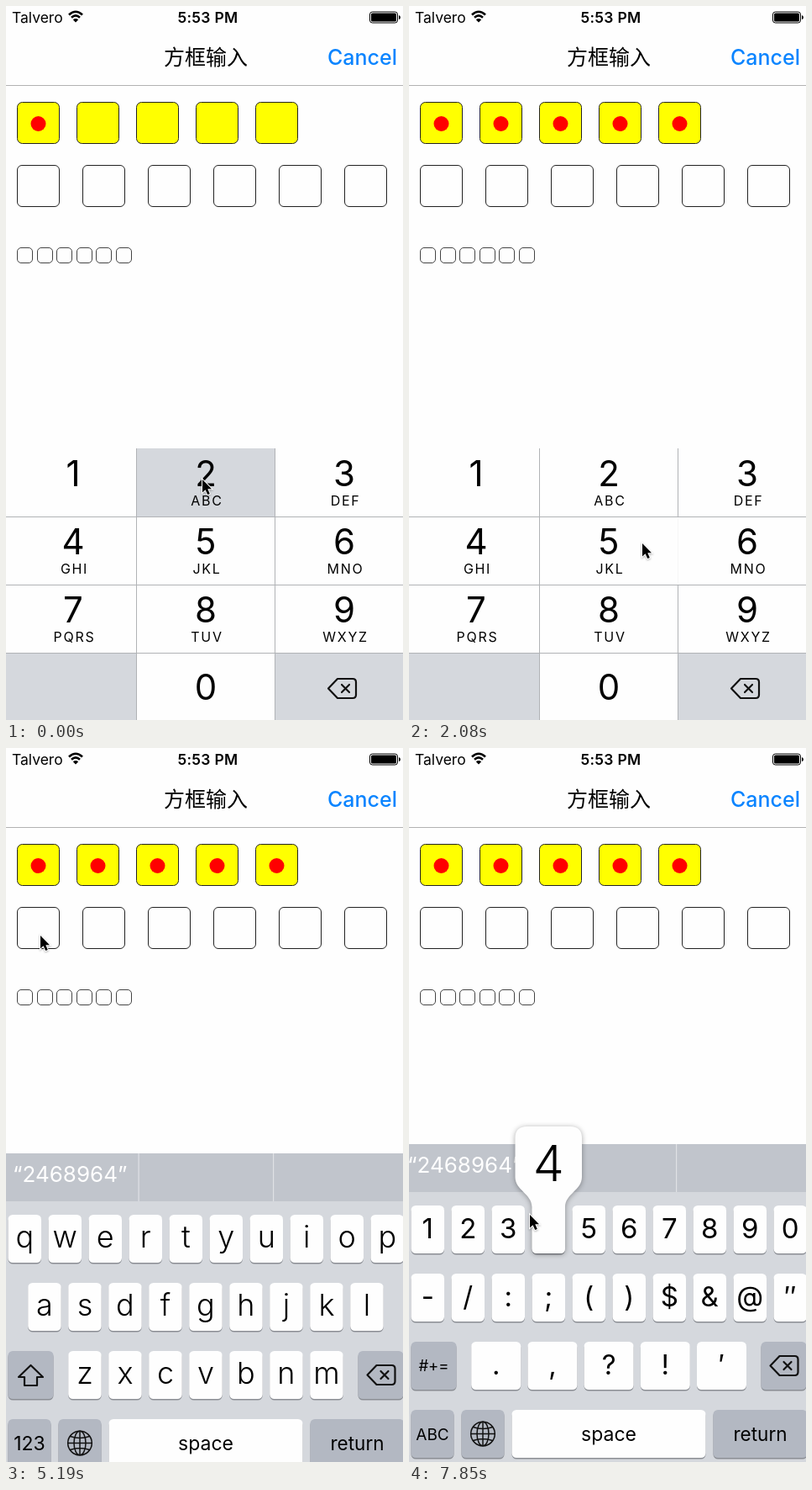
An HTML page for the animation above (7990 ms loop, 473 by 849 pixels).

```html
<!DOCTYPE html>
<html lang="zh">
<head>
<meta charset="utf-8">
<title>方框输入</title>
<style>
html, body { margin: 0; width: 100%; height: 100%; overflow: hidden; background: #fff; }
svg { display: block; width: 473px; height: 849px; }
text { font-family: Inter, Roboto, sans-serif; white-space: pre; }
.cjk { font-family: "Noto Sans CJK SC", "Noto Sans CJK", sans-serif; }
.icon { fill: none; stroke: #111; stroke-width: 2.2; stroke-linejoin: round; stroke-linecap: round; }
#pop path { fill: #fefefe; filter: drop-shadow(0 1px 3px rgba(0, 0, 0, .35)); }
</style>
</head>
<body>
<svg id="stage" viewBox="0 0 473 849"></svg>
<script>
const LOOP = 7990;
const GRAY = '#d5d8dd', DARK = '#b3b8c2', BLUE = '#0a84ff';

// Bursts of picture changes: [first, last, count]
const BURSTS = [
  [150, 1180, 8], [1330, 2080, 6], [2680, 3280, 5], [3580, 4600, 8],
  [4740, 5780, 8], [5920, 6960, 8], [7110, 7850, 6]
];
const TICKS = [0, ...BURSTS.flatMap(([from, to, n]) =>
  Array.from({ length: n }, (_, i) =>
    Math.round((from + (to - from) * i / (n - 1)) / 10) * 10))];

// Pointer path: [time, x, y]
const POINTER = [
  [0, 234, 563], [150, 110, 645], [440, 400, 650], [590, 270, 698],
  [740, 390, 700], [890, 400, 650], [1030, 105, 652], [1180, 105, 656],
  [1330, 102, 718], [1480, 104, 716], [2080, 278, 639], [2530, 278, 639],
  [3280, 441, 85], [3430, 441, 85], [3730, 442, 61], [4170, 442, 61],
  [4600, 41, 223], [5330, 41, 223], [5920, 325, 640], [6070, 335, 650],
  [6220, 335, 650], [6370, 358, 582], [6660, 140, 650], [6960, 98, 829],
  [7110, 42, 822], [7260, 28, 820], [7400, 30, 818], [7700, 128, 580], [7850, 144, 555]
];
// Downward offsets: [time, dy]
const PAD_SLIDE = [[0, 0], [4170, 50], [4310, 230], [4460, 330]];
const BOARD_SLIDE = [[0, 400], [4740, 340], [4890, 150], [5040, 45], [5190, 11], [5330, 0]];

const EVENTS = [
  [0, { dots: 1, pad: 2, pop: '', cancel: false, board: 'abc' }],
  [150, { dots: 2, pad: 4 }], [300, { pad: 0 }],
  [440, { dots: 3, pad: 6 }], [590, { dots: 4, pad: 0 }],
  [740, { dots: 5 }], [890, { pad: 6 }], [1030, { pad: 4 }], [1180, { pad: 0 }],
  [1330, { pad: 7 }], [1480, { pad: 0 }],
  [3880, { cancel: true }], [4170, { cancel: false }],
  [6220, { pop: 'j' }], [6370, { pop: 'i' }], [6510, { pop: '' }],
  [6660, { pop: 'd' }], [6810, { pop: '' }],
  [7260, { board: 'num' }], [7850, { pop: '4' }]
];

const escape = s => s.replace(/&/g, '&amp;');
const text = (x, y, s, size, extra = 'text-anchor="middle"') =>
  `<text x="${x}" y="${y}" font-size="${size}" ${extra}>${escape(s)}</text>`;
const rect = (x, y, w, h, extra = '') =>
  `<rect x="${x}" y="${y}" width="${w}" height="${h}" ${extra}/>`;
const times = (n, make) => Array.from({ length: n }, (_, i) => make(i)).join('');
const middle = weight => `text-anchor="middle" font-weight="${weight}"`;

const erase = (x, y) => `<path class="icon" transform="translate(${x} ${y})"
  d="M12 1H30Q34 1 34 5V20Q34 24 30 24H12L1 12.5ZM17 8L26 17M26 8L17 17"/>`;

function statusBar() {
  return text(7, 20, 'Talvero', 17.5, '')
    + `<g fill="none" stroke="#000" stroke-width="2.6">
        <path d="M75 10.5Q83 3 91 10.5M78 13.7Q83 9 88 13.7"/></g>
       <path d="M83 19.5L79.8 16.3Q83 13.5 86.2 16.3Z"/>`
    + text(240.5, 20, '5:53 PM', 17.5, middle(600) + ' letter-spacing=".3"')
    + rect(433.5, 7, 33, 13, 'rx="3" fill="none" stroke="#000"')
    + rect(435, 8.5, 30, 10, 'rx="1.5"')
    + '<path d="M468 11Q470 11.5 470 13.5T468 16Z"/>';
}

function form() {
  const box = 'fill="none" stroke="#222" rx="5.5"';
  return text(238, 70, '方框输入', 25, 'class="cjk" text-anchor="middle" font-weight="500"')
    + rect(384, 47, 82, 30, 'id="cancelBack" fill="#f8f8f8"')
    + text(466, 70, 'Cancel', 25, `id="cancel" text-anchor="end" font-weight="500" fill="${BLUE}"`)
    + rect(0, 94, 473, 1, 'fill="#b2b2b2"')
    + times(5, i => rect(13.5 + 71 * i, 114.5, 50, 49, 'fill="#ff0" stroke="#222" rx="6"'))
    + times(5, i => `<circle class="dot" cx="${38.5 + 71 * i}" cy="140" r="9" fill="red"/>`)
    + times(6, i => rect(13.5 + 78 * i, 189.5, 50, 49, box))
    + times(6, i => rect(Math.round(13 + 23.6 * i) + .5, 287.5, 18, 18, 'fill="none" stroke="#444" rx="4.5"'));
}

const PAD_LEFT = [0, 156, 321, 473], PAD_MID = [80, 238, 403];
const padLetters = ['', 'ABC', 'DEF', 'GHI', 'JKL', 'MNO', 'PQRS', 'TUV', 'WXYZ'];

function numberPad() {
  const line = 'fill="#b1b3b6"';
  return rect(0, 526, 473, 323, 'fill="#fefefe"')
    + rect(0, 770, 155, 79, `fill="${GRAY}"`) + rect(321, 770, 152, 79, `fill="${GRAY}"`)
    + rect(0, 526, 0, 81, `id="padDown" fill="${GRAY}"`)
    + times(3, i => rect(0, 607 + 81 * i, 473, 1, line))
    + rect(155, 526, 1, 323, line) + rect(320, 526, 1, 323, line)
    + rect(320, 608, 1, 80, 'id="fade" fill="#f6f6f6"')
    + padLetters.map((s, i) => {
        const x = PAD_MID[i % 3], y = 571 + 81 * Math.floor(i / 3);
        return text(x, y, String(i + 1), 42)
          + text(x + 1.5, y + 23, s, 16, 'text-anchor="middle" letter-spacing="1.7"');
      }).join('')
    + text(238, 825, '0', 42) + erase(383, 799);
}

const keyAt = {};
function key(x, y, w, label = '', size = 36, weight = 300, fill = '#fefefe') {
  keyAt[label] = [x, y, weight];
  return rect(x, y + 1.5, w, 57, 'rx="5.5" fill="#8b8e94"')
    + rect(x, y, w, 57, `rx="5.5" fill="${fill}"`)
    + text(x + w / 2, y + (size < 30 ? 28.5 + size * .37 : 39), label, size, middle(weight));
}
const row = (labels, x, y, size, weight, w = 39.5, step = 48) =>
  [...labels].map((s, i) => key(x + step * i, y, w, s, size, weight)).join('');

function board() {
  const letters = row('qwertyuiop', 2.5, 544) + row('asdfghjkl', 26.2, 625) + row('zxcvbnm', 74.2, 706)
    + key(2.5, 706, 54, '', 20, 400, DARK)
    + '<path class="icon" d="M29.5 723L44 737H37V747H22V737H15Z"/>'
    + key(2.5, 787, 51, '123', 23, 400, DARK);
  const symbols = row('1234567890', 2.5, 544, 33, 400) + row('-/:;()$&@″', 2.5, 625, 33, 400)
    + row('.,?!′', 74.2, 706, 33, 400, 59, 67.2)
    + key(2.5, 706, 54, '#+=', 18.5, 400, DARK) + key(2.5, 787, 51, 'ABC', 19, 400, DARK);
  const globe = `<g class="icon" style="stroke-width:1.5" transform="translate(88 815.5)">
    <circle r="14.3"/><ellipse rx="7" ry="14.3"/>
    <path d="M0-14V14M-14 0H14M-11.5-8Q0-4 11.5-8M-11.5 8Q0 4 11.5 8"/></g>`;
  return rect(0, 471, 473, 400, `fill="${GRAY}"`) + rect(0, 471, 473, 57, 'fill="#c1c5cc"')
    + rect(157.5, 471, 1.2, 57, 'fill="#dfe1e5"') + rect(318, 471, 1.2, 57, 'fill="#dfe1e5"')
    + text(8, 505, '“2468964”', 26, 'id="hint" fill="#fff"')
    + key(419.5, 706, 54, '', 20, 400, DARK) + erase(429.5, 722)
    + key(62.5, 787, 51, '', 20, 400, DARK) + globe
    + key(122.5, 787, 231, 'space', 23, 400) + key(362.5, 787, 112, 'return', 22.5, 400, DARK)
    + `<g id="abc">${letters}</g><g id="num">${symbols}</g>
      <g id="pop"><path d="M-20-80Q-20-94-6-94H45.5Q59.5-94 59.5-80V-34C59.5-18 39.5-14 39.5 2
        V51Q39.5 57 33.5 57H6Q0 57 0 51V2C0-14-20-18-20-34Z"/>${text(19.7, -29, '', 59)}</g>`;
}

const stage = document.getElementById('stage');
stage.innerHTML = rect(0, 0, 473, 849, 'fill="#fefefe"') + statusBar() + form()
  + `<g id="pad">${numberPad()}</g><g id="board">${board()}</g>
     <path id="pointer" d="M0 0V15.5L3.6 12.3 6.2 18 8.8 16.9 6.3 11.2H11Z"
       stroke="#fff" stroke-width="2" paint-order="stroke" style="filter:drop-shadow(0 1px 1px rgba(0,0,0,.3))"/>`;

const $ = id => document.getElementById(id);
const dots = [...stage.querySelectorAll('.dot')];
const show = (el, on) => el.setAttribute('visibility', on ? 'visible' : 'hidden');
const move = (el, x, y) => el.setAttribute('transform', `translate(${x} ${y})`);
const held = (table, t) => table.filter(([at]) => at <= t).pop();

function pointerAt(t) {
  const next = POINTER.findIndex(([at]) => at > t);
  if (next < 0) return POINTER.at(-1).slice(1);
  const [t0, x0, y0] = POINTER[next - 1], [t1, x1, y1] = POINTER[next];
  const u = (t - t0) / (t1 - t0), k = u * u * (3 - 2 * u);
  return [x0 + (x1 - x0) * k, y0 + (y1 - y0) * k];
}

function draw(t) {
  const state = Object.assign({}, ...EVENTS.filter(([at]) => at <= t).map(e => e[1]));
  dots.forEach((dot, i) => show(dot, i < state.dots));
  show($('cancelBack'), state.cancel);
  $('cancel').setAttribute('fill', state.cancel ? '#cfe2fa' : BLUE);

  const index = state.pad - 1, col = index % 3;
  show($('padDown'), state.pad > 0);
  if (state.pad) {
    $('padDown').setAttribute('x', PAD_LEFT[col]);
    $('padDown').setAttribute('width', PAD_LEFT[col + 1] - PAD_LEFT[col] - 1 + (col === 2));
    $('padDown').setAttribute('y', 526 + 81 * Math.floor(index / 3));
  }
  show($('fade'), t >= 590);
  move($('pad'), 0, held(PAD_SLIDE, t)[1]);
  move($('board'), 0, held(BOARD_SLIDE, t)[1]);
  $('hint').setAttribute('x', t < 5330 ? 8 : -2);
  show($('abc'), state.board === 'abc');
  show($('num'), state.board === 'num');

  show($('pop'), state.pop);
  if (state.pop) {
    const [x, y] = keyAt[state.pop], label = $('pop').querySelector('text');
    move($('pop'), x, y);
    label.textContent = state.pop;
    label.setAttribute('font-weight', 300);
  }
  move($('pointer'), ...pointerAt(t));
}

const start = performance.now();
let last = -1;
function frame() {
  const t = (performance.now() - start) % LOOP;
  const tick = TICKS.filter(at => at <= t).pop();
  if (tick !== last) draw(last = tick);
  requestAnimationFrame(frame);
}
frame();
</script>
</body>
</html>
```
